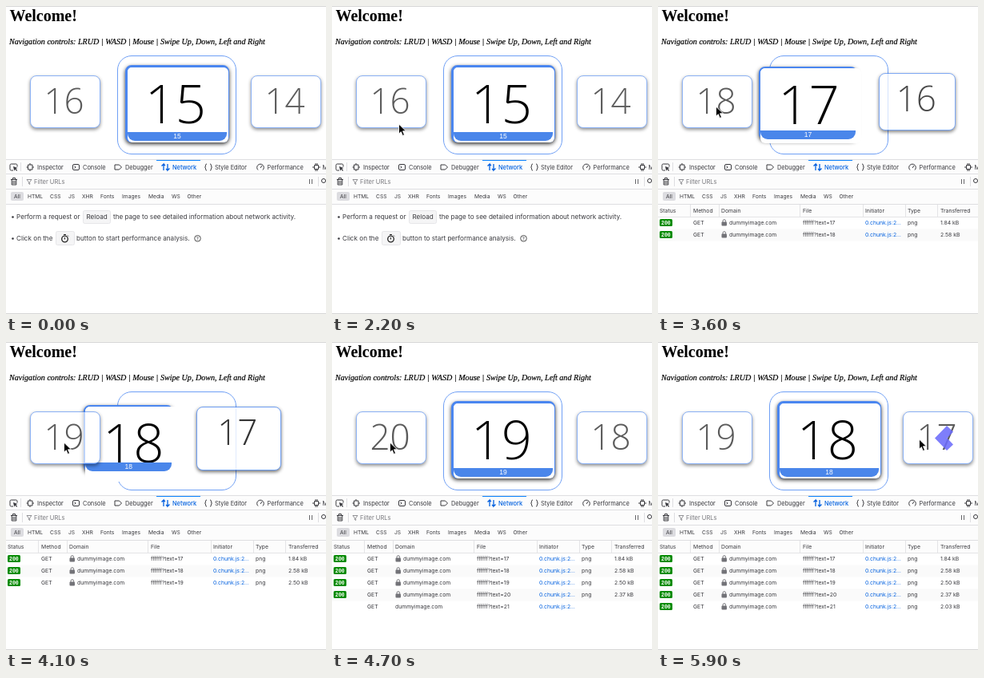
Write an HTML page that moves like this. It is 400x386 px and loops after 6000 ms.

```html
<!DOCTYPE html>
<html lang="en">
<head>
<meta charset="utf-8">
<title>Carousel</title>
<style>
html, body { margin: 0; width: 100%; height: 100%; overflow: hidden; background: #fff; }
#stage { position: absolute; left: 0; top: 0; width: 400px; height: 386px; overflow: hidden; }
svg { position: absolute; left: 0; top: 0; font-family: Inter, "Open Sans", sans-serif; }
.ring { position: absolute; left: 139px; top: 62px; width: 147px; height: 122px; border: 1px solid #6f9ff5; border-radius: 18px; }
.card { position: absolute; box-sizing: border-box; background: #fff; border: 1px solid #4a86f0; border-radius: 8px; box-shadow: 0 2px 4px rgba(0,0,0,.7); }
.num { position: absolute; left: 50%; top: 0; width: 84px; height: 60px; margin-left: -43.5px; font: 300 44px/60px "Open Sans", sans-serif; text-align: center; color: #000; }
.main { box-shadow: 0 2px 5px rgba(0,0,0,.8); }
.main .num { left: 0; margin: 0; width: 126px; height: 94px; font-size: 67px; line-height: 89px; text-indent: -6px; background: #fff; border-radius: 6px; }
.alt .num { left: 4px; top: 2px; margin: 0; font: 10px/12px "Liberation Sans", sans-serif; text-align: left; }
.bar { display: none; position: absolute; left: 0; right: 0; bottom: -1px; height: 11px; background: #4a86ea; color: #fff; font: 8.5px/11px "Liberation Sans", sans-serif; text-align: center; border-radius: 0 0 9px 9px; }
.main .bar { display: block; }
</style>
</head>
<body>
<div id="stage">
  <svg width="400" height="386" fill="#38383d">
    <path d="M0 .5h400M0 385.500h400" stroke="#d6d6d6"/>
    <g font-family="'Liberation Serif', serif" fill="#000">
      <text x="4.500" y="19" font-size="20" font-weight="700">Welcome!</text>
      <text x="4" y="48" font-size="10.100" font-style="italic" stroke="#000" stroke-width=".2">Navigation controls: LRUD | WASD | Mouse | Swipe Up, Down, Left and Right</text>
    </g>
    <path d="M0 192h400v56H0z" fill="#fcfcfc"/>
    <path d="M0 192.500h400M0 210.500h400M0 229.500h400M0 248.500h400M20.500 214v12M18.500 196v11M390.500 214v12" stroke="#dedee1"/>
    <path d="M188 193.500h55" stroke="#0a84ff"/>
    <g id="tabs" font-size="7.4"></g>
    <g fill="none" stroke="#38383d">
      <path d="M9 206H6.500q-1.500 0-1.500-1.500v-5q0-1.500 1.500-1.500h6q1.500 0 1.500 1.500v2"/>
      <path d="M9 201l5.500 2-2.300 1 2 2-1 .8-2-2-.9 2z" fill="#38383d" stroke="none"/>
      <path d="M27.500 199h5.500v6h-5.500zM30 197v2M30 205v2M25.500 202h2M33 202h2"/>
      <rect x="83.500" y="198.500" width="8" height="7" rx="1.500"/><path d="M85.500 200.500l1.500 1.500-1.500 1.500"/>
      <path d="M136 199h5.500l3 3-3 3H136z"/>
      <path d="M197 206v-8l-2.500 2.500M197 198l2 2M202 198v8l2.500-2.500M202 206l-2-2" stroke="#0060df" stroke-width="1.300"/>
      <path d="M251 198q-1.500 0-1.500 1.500v1.500l-1 1 1 1v1.500q0 1.500 1.500 1.500M255 198q1.500 0 1.500 1.500v1.500l1 1-1 1v1.500q0 1.500-1.500 1.500"/>
      <path d="M315 205.500a4.300 4.300 0 1 1 6 0M318 203l2-3"/>
      <path d="M385.500 199.500h5v5h-5zM387 197v2.500M389 197v2.500M387 204.500v2.500M389 204.500v2.500M383 202h2.500M390.500 202h2.500"/>
      <path d="M6 217.500h8M7.200 218v6h5.600v-6M8.500 217v-1.500h3v1.500M9 219v4M11 219v4"/>
      <path d="M26 217.500h6l-2.300 3v3l-1.400-1v-2z" stroke="#77777c" stroke-width=".8"/>
      <path d="M379.500 217v6M382.500 217v6" stroke="#66666a"/>
      <circle cx="397" cy="219" r="2.500"/>
    </g>
    <text x="35" y="222.500" font-size="7.500" fill="#77777c">Filter URLs</text>
    <rect x="6" y="233" width="16" height="11" rx="2" fill="#dcdce0"/>
    <g id="filters" font-size="6.700"></g>
    <g id="hint" font-size="8.150">
      <circle cx="8.500" cy="264.500" r="1.300"/><circle cx="8.500" cy="291.500" r="1.300"/>
      <g fill="#f5f5f6" stroke="#e6e6e9"><rect x="96.500" y="256.500" width="34" height="16" rx="2"/><rect x="62.500" y="282.500" width="23" height="17" rx="2"/></g>
      <text x="13" y="267.300">Perform a request or</text>
      <text x="100.500" y="267.300">Reload</text>
      <text x="134" y="267.300">the page to see detailed information about network activity.</text>
      <text x="13" y="294">Click on the</text>
      <text x="88" y="294">button to start performance analysis.</text>
      <g fill="none" stroke="#222"><circle cx="73.500" cy="292" r="3.800" stroke-width="1.300"/><path d="M73.500 292.500v-2.500M72 286.500h3M77 287.500l1 1"/><circle cx="239.500" cy="291.300" r="3.800" stroke-width=".8"/></g>
      <text x="237.800" y="293.600" font-size="6">?</text>
    </g>
    <g id="table" font-size="6.800"></g>
  </svg>
  <div class="ring"></div>
  <svg id="over" width="400" height="386">
    <path id="arrow" fill="#6c6cfa" fill-opacity=".88" d="M-11.500-8l8-7.500 15 15.500-15 15.500-8-7.500 7.500-8z"/>
    <path id="cursor" d="M0 0v12.200l2.800-2.600 2 4.800 2.200-.9-2-4.700h4z" stroke="#fff" stroke-width=".9"/>
  </svg>
</div>
<script>
const LOOP = 6000, FIRST = 15, SLOTS = [74, 214, 350], GROW = 0.48;
// [time, step]
const clicks = [[2700, 1], [3400, 1], [4000, 1], [4300, 1], [4710, 1], [5200, -1], [5500, -1]];
const sizes = ["1.84 kB", "2.58 kB", "2.50 kB", "2.37 kB", "2.03 kB"];
const requests = sizes.map((size, i) => ({
  size, n: FIRST + 2 + i,
  start: i ? clicks[i][0] - 20 : 3100,
  done: i ? clicks[i][0] + 80 : 3150
}));
// [time, x, y]
const path = [[1900, 98, 180], [2200, 83.5, 148], [2500, 72.5, 126], [4930, 72.5, 126], [5180, 326.5, 122], [LOOP, 326.5, 122]];
const $ = id => document.getElementById(id);
const label = (x, y, s, extra = "") => `<text x="${x}" y="${y}" ${extra}>${s}</text>`;

$("tabs").innerHTML = [[39, "Inspector"], [96, "Console"], [149, "Debugger"], [208, "Network"], [261, "Style Editor"], [326.5, "Performance"], [395.5, "Memory"]]
  .map(([x, s]) => label(x, 204.7, s, s == "Network" ? 'fill="#0060df" font-weight="500"' : "")).join("");
$("filters").innerHTML = [[10, "All"], [27, "HTML"], [55, "CSS"], [78, "JS"], [95, "XHR"], [118, "Fonts"], [145, "Images"], [178, "Media"], [207, "WS"], [226.5, "Other"]]
  .map(([x, s]) => label(x, 241, s)).join("");

const cols = [2, 44, 79, 181, 259, 312, 353];
const header = '<path d="M0 249h400v15H0z" fill="#fcfcfc"/><path d="M0 264.500h400M40.500 249v15M76.500 249v15M177.500 249v15M256.500 249v15M309.500 249v15M349.500 249v15" stroke="#e4e4e6"/>' +
  ["Status", "Method", "Domain", "File", "Initiator", "Type", "Transferred"].map((s, i) => label(cols[i], 258.5, s)).join("");

function row(r, i, t) {
  const y = 271.5 + i * 15, base = y + 2.5, done = t >= r.done;
  let s = i % 2 ? `<path d="M0 ${y - 7}h400v15H0z" fill="#fafafa"/>` : "";
  s += label(44, base, "GET") + label(done ? 89 : 79, base, "dummyimage.com") +
    label(181, base, "ffffff?text=" + r.n) + label(259, base, "0.chunk.js:2…", 'fill="#0060df"');
  if (done) s += `<rect x="2" y="${y - 4.5}" width="16" height="9" rx="1.500" fill="#058b00"/>` +
    label(4, base, "200", `fill="#fff" font-size="6.500" font-weight="700" font-family="'Liberation Mono', monospace"`) +
    `<rect x="79.500" y="${y - 1}" width="6.500" height="5" rx="1" fill="#737378"/><path d="M81 ${y}v-2q0-1.800 1.800-1.800t1.800 1.800v2" fill="none" stroke="#737378"/>` +
    label(312, base, "png") + label(353, base, r.size);
  return s;
}

const cards = [0, 1, 2].map(() => {
  const el = document.createElement("div");
  el.innerHTML = '<div class="num"></div><div class="bar"></div>';
  $("stage").insertBefore(el, $("over"));
  return el;
});

function place(el, n, x, grow, opacity, kind) {
  const s = 1 + GROW * grow, w = 88 * s, h = 66 * s;
  el.className = "card " + kind;
  el.style.cssText = `left:${x - w / 2}px;top:${120 + 2.5 * grow - h / 2}px;width:${w}px;height:${h}px;opacity:${opacity};border-width:${1 + 2 * grow}px`;
  for (const part of el.children) part.textContent = n;
}

function drawCards(t) {
  let n = FIRST, step = 1, left = 0;
  for (const [at, d] of clicks) if (t >= at) {
    n += d;
    step = d;
    left = t - at < 390 ? Math.exp((at - t) / 120) : 0;
  }
  const from = 1 - step, to = 1 + step, mid = SLOTS[1];
  const loading = n + 1 > 16 && t < (n == 16 ? 3150 : requests[n - 16].done);
  place(cards[0], n, mid + (SLOTS[from] - mid) * left, 1 - left, 1, "main");
  place(cards[1], n + step, SLOTS[from], 0, 0.64, loading && step > 0 ? "alt" : "");
  place(cards[2], n - step, SLOTS[to] + (mid - SLOTS[to]) * left, left, 0.64 + 0.36 * left, "");
}

function drawPointer(t) {
  const shown = t >= path[0][0];
  $("cursor").style.display = shown ? "" : "none";
  if (shown) {
    const i = path.findIndex(p => t < p[0]), [t0, x0, y0] = path[i - 1], [t1, x1, y1] = path[i];
    const u = (t - t0) / (t1 - t0), e = u * u * (3 - 2 * u);
    $("cursor").setAttribute("transform", `translate(${x0 + (x1 - x0) * e} ${y0 + (y1 - y0) * e})`);
  }
  const atRight = t >= 5700;
  $("arrow").style.display = atRight || (t >= 2700 && t < 3200) ? "" : "none";
  $("arrow").setAttribute("transform", atRight ? "translate(357.500 120.500) scale(-1 1)" : "translate(66.500 121)");
}

let tableKey = "";
function drawTable(t) {
  const open = requests.filter(r => t >= r.start);
  const key = open.length + "/" + open.filter(r => t >= r.done).length;
  if (key == tableKey) return;
  tableKey = key;
  $("hint").style.display = open.length ? "none" : "";
  $("table").innerHTML = open.length ? header + open.map((r, i) => row(r, i, t)).join("") : "";
}

let began;
function frame(now) {
  began ??= now;
  const t = Math.max(0, now - began) % LOOP;
  drawCards(t);
  drawPointer(t);
  drawTable(t);
  requestAnimationFrame(frame);
}
requestAnimationFrame(frame);
</script>
</body>
</html>
```
